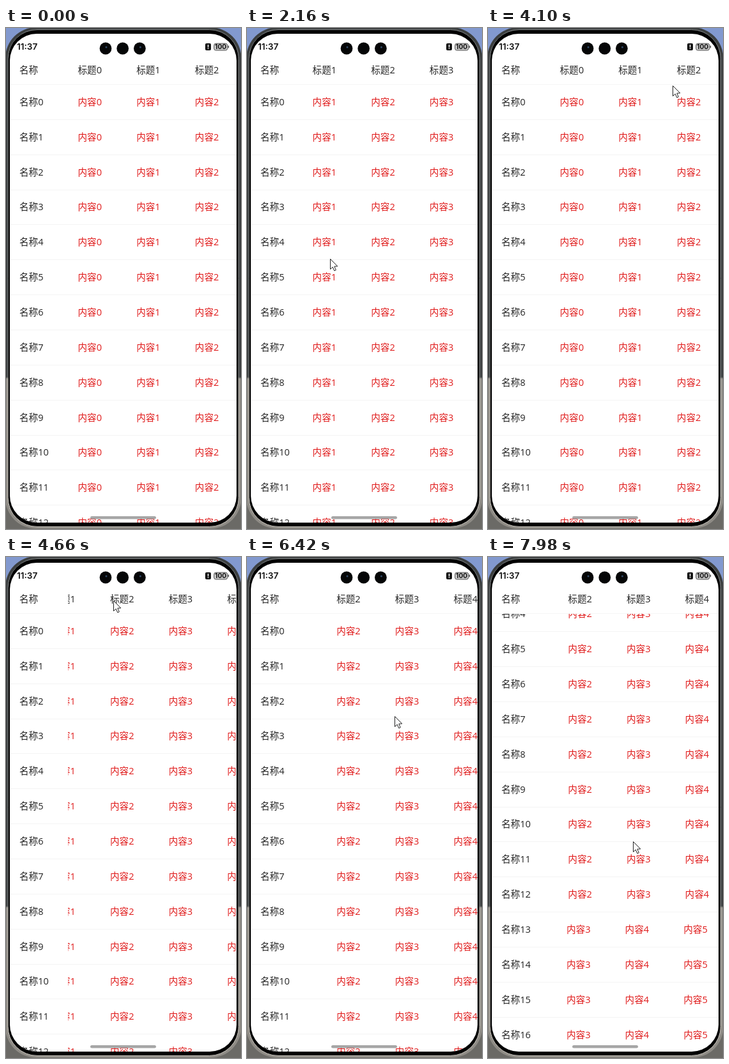
Write an HTML page with a canvas that moves like this. It is 368 by 784 pixels and loops after 8 s.

```html
<!DOCTYPE html>
<html lang="zh-CN">
<head>
<meta charset="utf-8">
<title>表格滚动</title>
<style>
html, body { margin: 0; width: 368px; height: 784px; overflow: hidden; }
canvas { display: block; width: 368px; height: 784px; }
</style>
</head>
<body>
<canvas id="stage"></canvas>
<script>
const LOOP = 8000, STEP = 77.6, FIRST = 825;
const ROW = 54.85, COL = 91.65, COL_X = 112.5, HEAD = 88;
const TABLE_FONT = '400 14.6px "Open Sans", "Noto Sans CJK SC", "Noto Sans CJK", sans-serif';
const INK = '#242424', RED = '#e01c1c';

const canvas = document.getElementById('stage');
const ctx = canvas.getContext('2d');
const ratio = window.devicePixelRatio || 1;
canvas.width = 368 * ratio;
canvas.height = 784 * ratio;
ctx.scale(ratio, ratio);

// turning points of the pointer
const path = [
  { t: 126, x: 184, y: 702 },
  { t: 650, x: 286, y: 345 },
  { t: 825, x: 286, y: 345 },
  { t: 1135, x: 128, y: 356 },
  { t: 1640, x: 250, y: 352 },
  { t: 2144, x: 130, y: 361 },
  { t: 2920, x: 265, y: 352 },
  { t: 3350, x: 125, y: 354 },
  { t: 4220, x: 300, y: 72 },
  { t: 4627, x: 168, y: 68 },
  { t: 5015, x: 259, y: 80 },
  { t: 5480, x: 247, y: 80 },
  { t: 5870, x: 247, y: 80 },
  { t: 5880, x: 345, y: 249 },
  { t: 6555, x: 216, y: 249 },
  { t: 7000, x: 229, y: 691 },
  { t: 7964, x: 227, y: 445 }
];

// sideways drags; origin is the pointer x that leaves the table unscrolled
const drags = [
  { start: 825, end: 4220, origin: 231.6 },
  { start: 4220, end: 5015, origin: 300.8 },
  { start: 5880, end: 6555, origin: 386.5 }
];
const PULL_START = 7000, PULL_Y = 691;

function pointerAt(t) {
  const next = path.findIndex(p => p.t > t);
  if (next < 1) return path.at(next);
  const a = path[next - 1], b = path[next];
  const u = (t - a.t) / (b.t - a.t), k = u * u * (3 - 2 * u);
  return { x: a.x + (b.x - a.x) * k, y: a.y + (b.y - a.y) * k };
}

function scrollX(t) {
  const drag = drags.findLast(d => d.start <= t);
  return drag ? Math.max(0, drag.origin - pointerAt(Math.min(t, drag.end)).x) : 0;
}

const scrollY = t => t < PULL_START ? 0 : PULL_Y - pointerAt(t).y;
const pointerShown = t => t > 120 && !(t > 5610 && t < 5870);

function box(x, y, w, h, r, fill, stroke) {
  ctx.beginPath();
  ctx.roundRect(x, y, w, h, r);
  if (fill) { ctx.fillStyle = fill; ctx.fill(); }
  if (stroke) { ctx.strokeStyle = stroke; ctx.lineWidth = 1; ctx.stroke(); }
}

function disc(x, y, r, fill) {
  ctx.beginPath();
  ctx.arc(x, y, r, 0, 7);
  ctx.fillStyle = fill;
  ctx.fill();
}

function label(str, x, y, fill, font = TABLE_FONT) {
  ctx.font = font;
  ctx.fillStyle = fill;
  ctx.fillText(str, x, y);
}

function clipped(x, y, w, h, r, draw) {
  ctx.save();
  box(x, y, w, h, r);
  ctx.clip();
  draw();
  ctx.restore();
}

// upper colour, changing to the lower one where the side turns bright
function split(upper, lower) {
  const g = ctx.createLinearGradient(0, 546, 0, 549);
  g.addColorStop(0, upper);
  g.addColorStop(1, lower);
  return g;
}
const wall = split('#8299cf', '#6b6a66');
const metal = split('#3c3f40', '#8f8c86');
const shine = split('#85898a', '#cfcbc3');

function drawPhone() {
  ctx.fillStyle = wall;
  ctx.fillRect(0, 0, 368, 784);
  box(-1, -1, 369.5, 784.5, 48, metal);
  box(3, 2.5, 361.5, 778, 46, '#111', shine);
  box(4.3, 4.5, 358.5, 773.5, 41, '#000');
  box(6, 9, 355, 765, 42, '#fff');
}

function drawStatus() {
  label('11:37', 17, 34, '#111', '600 13.6px Inter, sans-serif');
  for (let i = 0; i < 3; i++) {
    const x = 156 + i * 26.7;
    disc(x, 32, 9.4, '#050607');
    if (i !== 1) disc(x + 1, 30, 1.5, '#304a68');
  }
  box(312, 24, 9, 11, 2, '#111');
  box(315.8, 26, 1.5, 4.5, 0, '#fff');
  box(315.8, 31.5, 1.5, 1.5, 0, '#fff');
  box(325.7, 24.2, 21, 10.8, 3, '#c9c9c9', '#555');
  box(347.6, 27.5, 1.5, 4, 1, '#444');
  label('100', 327, 33.3, '#111', '700 10.2px Inter, sans-serif');
}

function drawCells(word, baseline, shift, color) {
  for (let i = 0; i < 8; i++) {
    const x = COL_X + i * COL - shift;
    if (x > 50 && x < 361) label(word + i, x, baseline, color);
  }
}

function drawRow(i, top, dx) {
  const baseline = top + 32.9;
  // rows created later keep their own offset
  const shift = i > 12 ? 264.5 : dx;
  box(6, Math.round(top), 355, 1, 0, '#f4f4f4');
  label('名称' + i, 21, baseline, INK);
  clipped(97, top, 264, ROW, 0, () => drawCells('内容', baseline, shift, RED));
}

function drawTable(dx, dy) {
  label('名称', 21, 71.4, INK);
  clipped(97, 40, 264, 48, 0, () => drawCells('标题', 71.4, dx, INK));
  clipped(6, HEAD, 355, 774 - HEAD, 0, () => {
    for (let i = 0; i < 20; i++) drawRow(i, HEAD + i * ROW - dy, dx);
  });
  box(6, HEAD, 355, 1, 0, '#f6f6f6');
}

const arrow = new Path2D('M0 0V16L3.7 12.6 6.3 18.4 8.8 17.3 6.3 11.6 11.3 11.4Z');

function drawPointer({ x, y }) {
  ctx.save();
  ctx.translate(Math.round(x) + .5, Math.round(y) + .5);
  ctx.fillStyle = '#fff';
  ctx.fill(arrow);
  ctx.strokeStyle = '#222';
  ctx.lineWidth = 1;
  ctx.stroke(arrow);
  ctx.restore();
}

function draw(now) {
  const t = FIRST + Math.floor((now % LOOP - FIRST) / STEP) * STEP;
  drawPhone();
  clipped(6, 9, 355, 765, 42, () => {
    drawTable(scrollX(t), scrollY(t));
    drawStatus();
    box(132, 764, 103, 4.6, 2.3, '#a6a6a6');
    if (pointerShown(t)) drawPointer(pointerAt(t));
  });
  requestAnimationFrame(draw);
}
requestAnimationFrame(draw);
</script>
</body>
</html>
```
